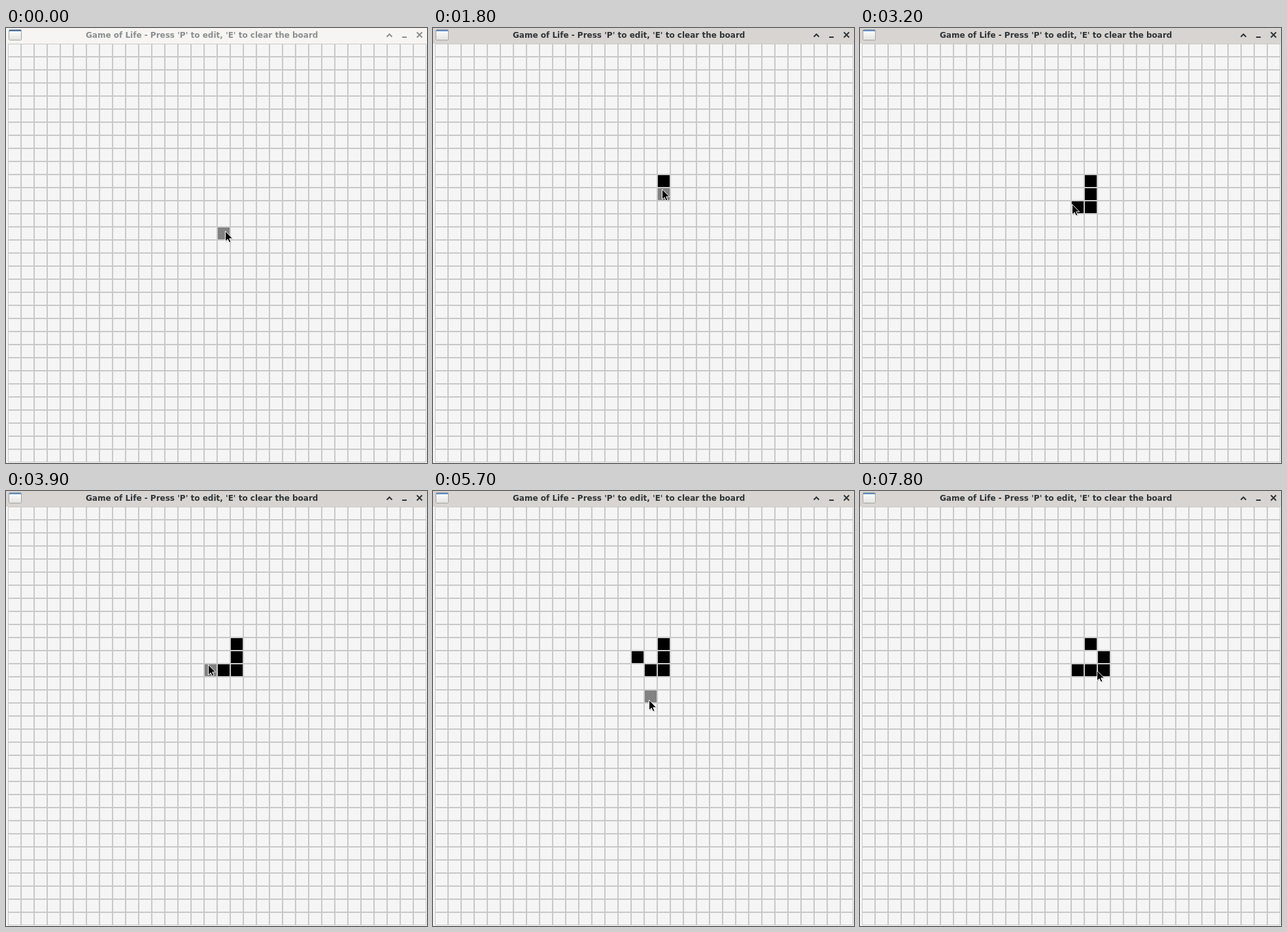
Write an HTML page that moves like this. It is 644 px wide and 665 px high and loops after 8 s.

```html
<!DOCTYPE html>
<html lang="en">
<head>
<meta charset="utf-8">
<title>Game of Life</title>
<style>
  html, body { margin: 0; width: 100%; height: 100%; overflow: hidden; background: #f5f5f5; }
  body { --bar: #f6f5f4; --ink: #8b8e8f; --stripe: #4673a8; }
  body.focused { --bar: #d8d4d1; --ink: #2e3436; --stripe: #5c8cc4; }
  svg { display: block; }
  #title {
    position: absolute; left: 122px; top: 4px; white-space: nowrap;
    font: bold 12px/14px "DejaVu Sans", sans-serif; color: var(--ink);
  }
  #bar { fill: var(--bar); }
  #stripe { stroke: var(--stripe); stroke-width: 2; }
  #buttons { fill: none; stroke: var(--ink); stroke-width: 2; }
</style>
</head>
<body>
<svg width="644" height="665" viewBox="0 0 644 665">
  <defs>
    <pattern id="grid" x="3" y="24" width="20" height="20" patternUnits="userSpaceOnUse">
      <rect width="20" height="20" fill="#c8c8c8"/>
      <rect x="1" y="1" width="18" height="18" fill="#f5f5f5"/>
    </pattern>
    <linearGradient id="pane" x2="0" y2="1">
      <stop stop-color="#fff"/>
      <stop offset="1" stop-color="#e2e3e1"/>
    </linearGradient>
  </defs>

  <rect id="bar" width="644" height="24"/>
  <rect x="4.5" y="2.5" width="19" height="16" rx="1" fill="url(#pane)" stroke="#a3a4a2"/>
  <path id="stripe" d="M5 4h18"/>
  <g id="buttons">
    <path d="M582.5 13.5l4-4 4 4"/>
    <path d="M606 14h7"/>
    <path d="M628.5 6.5l8 8m0-8l-8 8"/>
  </g>

  <rect x="3" y="24" width="640" height="640" fill="url(#grid)"/>
  <path id="hover" fill="#828282"/>
  <path id="alive"/>
  <g id="cursor">
    <path d="M1.5 2v15.5l3.5-3 2.5 4.5 2.5-1-2-5h4.5z" opacity=".2"/>
    <path d="M.5 .6v15.6l3.6-3.3 2.4 5.2 2.5-1.1-2.3-5.1h5z" stroke="#fff"/>
  </g>
</svg>
<div id="title">Game of Life - Press 'P' to edit, 'E' to clear the board</div>
<script>
const LOOP = 8000, STEP = 100, FOCUS = 1600, RUN = 7400, GENERATION = 300;
const CLICKS = [1600, 2200, 2600, 3200, 4300, 4600, 5100];

// Pointer strokes: it starts at HOME and glides to x, y between two times.
const HOME = { x: 335, y: 310 };
const glide = (from, to, x, y) => ({ from, to, x, y });
const STROKES = [
  glide(400, 500, 332, 308),
  glide(600, 1000, 337, 237),
  glide(1000, 1300, 350, 238),
  glide(1500, 2400, 350, 263),
  glide(2600, 3200, 324, 269),
  glide(3200, 3600, 308, 253),
  glide(3700, 4000, 309, 271),
  glide(4200, 4600, 308, 249),
  glide(4600, 4800, 310, 271),
  glide(5100, 5900, 337, 335),
  glide(5900, 6200, 436, 360),
  glide(6200, 6500, 365, 276),
  glide(6600, 6800, 362, 274)
];

const el = id => document.getElementById(id);
const key = (col, row) => col + "," + row;
const parse = cell => cell.split(",").map(Number);

function square(cell) {
  const [col, row] = parse(cell);
  return `M${4 + 20 * col} ${25 + 20 * row}h18v18h-18z`;
}

function pointer(t) {
  let { x, y } = HOME;
  for (const s of STROKES) {
    const k = Math.min(1, Math.max(0, (t - s.from) / (s.to - s.from)));
    x += (s.x - x) * k;
    y += (s.y - y) * k;
  }
  return [Math.round(x), Math.round(y)];
}

function cellUnder([x, y]) {
  return key(Math.floor((x - 2) / 20), Math.floor((y - 23) / 20));
}

function evolve(cells) {
  const counts = new Map();
  for (const cell of cells) {
    const [col, row] = parse(cell);
    for (let dx = -1; dx <= 1; dx++)
      for (let dy = -1; dy <= 1; dy++) {
        if (!dx && !dy) continue;
        const near = key(col + dx, row + dy);
        counts.set(near, (counts.get(near) || 0) + 1);
      }
  }
  return new Set([...counts]
    .filter(([cell, n]) => n === 3 || (n === 2 && cells.has(cell)))
    .map(([cell]) => cell));
}

function board(t) {
  let cells = new Set();
  for (const click of CLICKS.filter(c => c <= t)) {
    const cell = cellUnder(pointer(click));
    if (!cells.delete(cell)) cells.add(cell);
  }
  for (let g = RUN + STEP; g <= t; g += GENERATION) cells = evolve(cells);
  return cells;
}

function draw(t) {
  const pos = pointer(t);
  document.body.classList.toggle("focused", t >= FOCUS);
  el("alive").setAttribute("d", [...board(t)].map(square).join(""));
  el("hover").setAttribute("d", t < RUN ? square(cellUnder(pos)) : "");
  el("cursor").setAttribute("transform", `translate(${pos})`);
}

// The picture changes only on whole steps.
const start = performance.now();
let shown = -1;
function frame() {
  const t = Math.floor((performance.now() - start) % LOOP / STEP) * STEP;
  if (t !== shown) draw(shown = t);
  requestAnimationFrame(frame);
}
frame();
</script>
</body>
</html>
```
